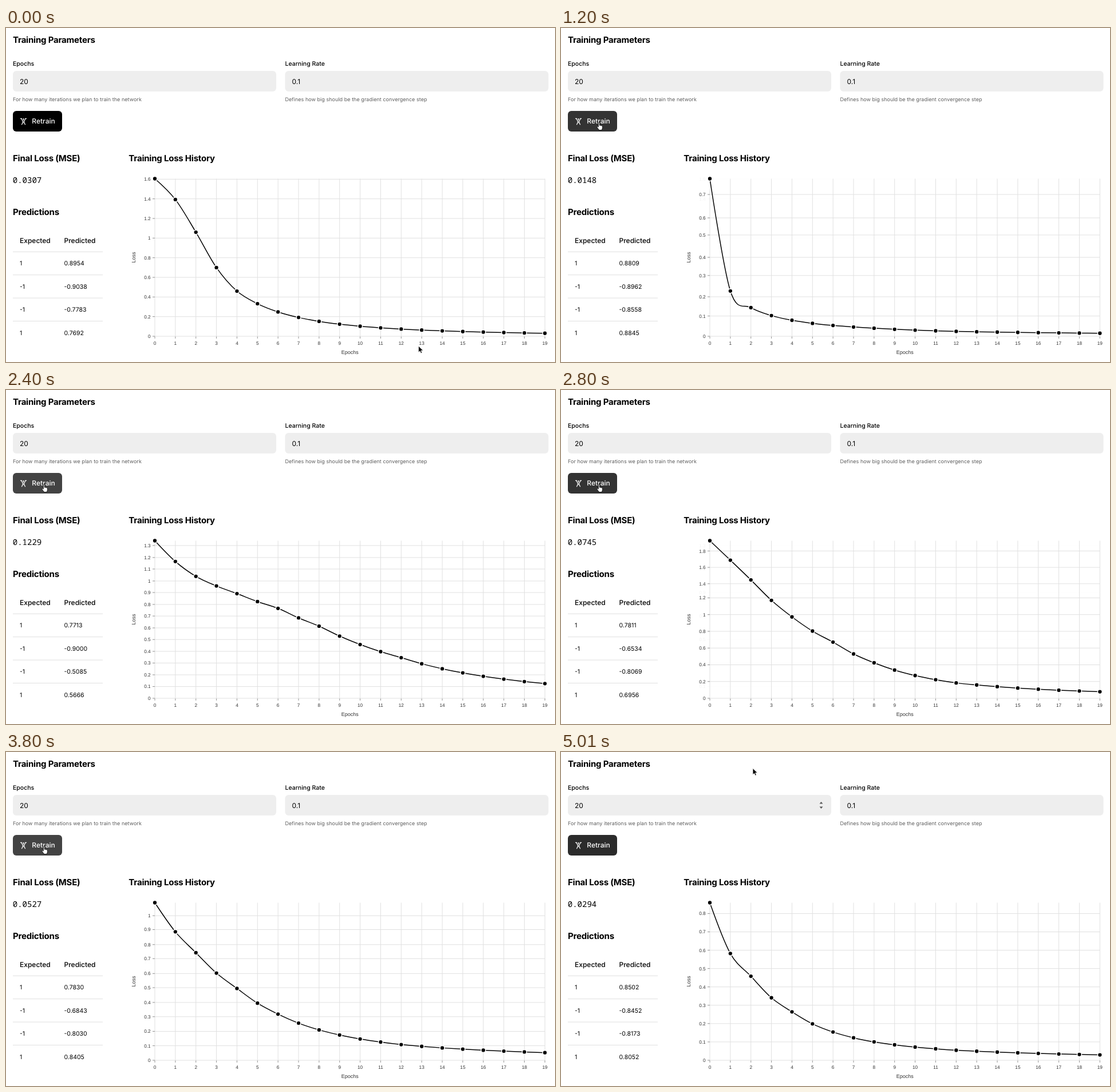
An HTML page for the animation above (5080 ms loop, 959 px wide and 584 px high).

```html
<!DOCTYPE html>
<html lang="en">
<head>
<meta charset="utf-8">
<title>Training dashboard</title>
<style>
  html, body { margin: 0; width: 100%; height: 100%; overflow: hidden; background: #fff; }
  svg { display: block; width: 100%; height: 100%; }
  text { font-family: Inter, sans-serif; font-size: 10.5px; text-rendering: geometricPrecision; }
  .title { font-size: 15px; font-weight: 700; letter-spacing: -.22px; }
  .label { font-weight: 500; }
  .value { font-size: 12px; }
  .head, .action { font-size: 12px; font-weight: 500; }
  .action { fill: #fff; }
  .hint { font-size: 9px; fill: #5e5e5e; letter-spacing: .04px; }
  .mono { font-family: "Noto Sans Mono", monospace; font-size: 14px; font-weight: 500; }
  .tick { font-family: "Liberation Sans", Arial, sans-serif; font-size: 8.25px; fill: #333; }
  .legend { font-family: "Liberation Sans", Arial, sans-serif; font-size: 9px; fill: #333; text-anchor: middle; }
  .grid { stroke: #e0e0e0; }
  .mark { stroke: #777; stroke-width: .8; }
  .curve { fill: none; stroke: #000; stroke-width: 1.5; }
  .dot { stroke: #fff; stroke-width: 1.5; }
</style>
</head>
<body>
<svg viewBox="0 0 959 584" preserveAspectRatio="none">
  <text class="title" x="12" y="26">Training Parameters</text>
  <text class="label" x="12" y="66">Epochs</text>
  <text class="label" x="487.5" y="66">Learning Rate</text>
  <rect x="12" y="75" width="460" height="36" rx="6" fill="#eee"/>
  <rect x="487.5" y="75" width="460" height="36" rx="6" fill="#eee"/>
  <text class="value" x="24" y="97.5">20</text>
  <text class="value" x="499.5" y="97.5">0.1</text>
  <path id="spinner" d="M451.5 90.5h6l-3 -3.6zM451.5 95.5h6l-3 3.6z" fill="#555"/>
  <text class="hint" x="12" y="128.3">For how many iterations we plan to train the network</text>
  <text class="hint" x="487.5" y="128.3">Defines how big should be the gradient convergence step</text>

  <rect id="button" x="12" y="145" width="86" height="36" rx="6"/>
  <g fill="none" stroke="#fff" stroke-width="1.2">
    <path d="M25 158.3h3M33 158.3h3M26.5 158.3l2.6 4.2h2.8l2.6 -4.2M29.3 162.5v2.8l-2 4M31.7 162.5v2.8l2 4M29.3 165.3h2.4"/>
    <circle cx="30.5" cy="159.6" r=".7"/>
  </g>
  <text class="action" x="45.3" y="167.4">Retrain</text>

  <text class="title" x="12" y="233.4">Final Loss (MSE)</text>
  <text class="title" x="214.3" y="233.4">Training Loss History</text>
  <text class="mono" id="loss" x="11.8" y="271"></text>
  <text class="title" x="12" y="327.4">Predictions</text>
  <text class="head" x="24" y="375.8">Expected</text>
  <text class="head" x="101.5" y="375.8">Predicted</text>
  <g id="table"></g>

  <g id="axis"></g>
  <text class="legend" x="600.7" y="569.5">Epochs</text>
  <text class="legend" transform="translate(225.8 401) rotate(-90)">Loss</text>
  <g id="plot"></g>

  <g id="arrow" stroke="#fff" stroke-width=".8">
    <path d="M0 0v11.2l2.6 -2.4l1.7 3.9l2 -.9l-1.7 -3.8h3.6z"/>
  </g>
  <g id="hand" fill="#fff" stroke="#000" stroke-width=".8" stroke-linejoin="round">
    <path d="M-1.2 7V.8q0 -1.2 1 -1.2t1 1.2v4q.9 -.8 1.8 .2q1 -.6 1.7 .4q1.6 -.4 1.6 1.2v2.6q0 1.4 -1 2.6v1.2h-5.4v-1q-1.8 -1.8 -3.2 -4.4q-.4 -1.2 .8 -1.2q.9 .2 1.7 1.4z"/>
  </g>
</svg>
<script>
const LOOP = 5080, FRAME = 1000 / 15, LEAVE = 4990, ARRIVE = 530;
const EPOCHS = 20, LEFT = 260, STEP_X = 35.86, TOP = 263.5, BASE = 539;
const RIGHT = LEFT + (EPOCHS - 1) * STEP_X;

// Losses are given at epoch 0 (max) and at these epochs (key).
const KEY_EPOCHS = [1, 2, 4, 6, 8, 12, 19];
const runs = [
  { at: 0, max: 1.605, key: [1.393, 1.06, .46, .248, .152, .073, .0307], out: "0.8954 -0.9038 -0.7783 0.7692" },
  { at: 835, max: .778, key: [.2, .122, .0715, .05, .038, .0235, .0148], out: "0.8809 -0.8962 -0.8558 0.8845" },
  { at: 1280, max: 1.921, key: [1.909, 1.897, 1.859, 1.789, 1.649, 1.048, .6432], out: "0.2695 -0.6067 0.1468 0.2455" },
  { at: 1850, max: 1.341, key: [1.163, 1.036, .888, .762, .61, .343, .1229], out: "0.7713 -0.9000 -0.5085 0.5666" },
  { at: 2440, max: 1.926, key: [1.689, 1.444, .979, .664, .409, .171, .0745], out: "0.7811 -0.6534 -0.8069 0.6956" },
  { at: 3290, max: 1.085, key: [.884, .74, .494, .317, .209, .108, .0527], out: "0.7830 -0.6843 -0.8030 0.8405" },
  { at: 3840, max: .859, key: [.582, .458, .264, .154, .1, .0546, .0294], out: "0.8502 -0.8452 -0.8173 0.8052" }
];

const $ = id => document.getElementById(id);
const clamp = v => Math.max(0, Math.min(1, v));
const mix = (a, b, k) => a + (b - a) * k;
const line = (cls, x1, y1, x2, y2, extra = "") =>
  `<line class="${cls}" x1="${x1}" y1="${y1}" x2="${x2}" y2="${y2}" ${extra}/>`;
const label = (cls, x, y, str, extra = "") =>
  `<text class="${cls}" x="${x}" y="${y}" ${extra}>${str}</text>`;
const plotY = (value, run) => BASE - value / run.max * (BASE - TOP);

// Between key epochs, max / loss - 1 grows as a power of the epoch.
function lossAt(run, epoch) {
  if (!epoch) return run.max;
  const b = Math.max(1, KEY_EPOCHS.findIndex(e => e >= epoch)), a = b - 1;
  const k = Math.log(epoch / KEY_EPOCHS[a]) / Math.log(KEY_EPOCHS[b] / KEY_EPOCHS[a]);
  const drop = i => run.max / run.key[i] - 1;
  return run.max / (1 + drop(a) ** (1 - k) * drop(b) ** k);
}

for (const run of runs) {
  const step = run.max > 1.5 ? .2 : .1;
  run.ticks = Array.from({ length: Math.floor(run.max / step) + 1 }, (_, i) => +(i * step).toFixed(1));
  run.ys = Array.from({ length: EPOCHS }, (_, i) => plotY(lossAt(run, i), run));
}

$("axis").innerHTML = Array.from({ length: EPOCHS }, (_, i) => {
  const x = LEFT + i * STEP_X;
  return line("grid", x, TOP, x, BASE) + line("mark", x, BASE, x, BASE + 4) +
    label("tick", x, 554.3, i, 'text-anchor="middle"');
}).join("");

// Critically damped spring, from 0 to 1.
const spring = ms => 1 - (1 + .013 * ms) * Math.exp(-.013 * ms);

// Cardinal spline through evenly spaced points.
function curve(ys) {
  const x = i => LEFT + i * STEP_X, last = ys.length - 1;
  const bend = i => i > 0 && i < last ? [STEP_X / 3, (ys[i + 1] - ys[i - 1]) / 6] : [0, 0];
  let d = `M${LEFT} ${ys[0]}`;
  for (let i = 0; i < last; i++) {
    const [ax, ay] = bend(i), [bx, by] = bend(i + 1);
    d += `C${x(i) + ax} ${ys[i] + ay} ${x(i + 1) - bx} ${ys[i + 1] - by} ${x(i + 1)} ${ys[i + 1]}`;
  }
  return d;
}

function drawPlot(run, prev, k) {
  const tick = (value, y, opacity) => `<g opacity="${opacity}">` +
    line("grid", LEFT, y, RIGHT, y) + line("mark", LEFT - 4, y, LEFT, y) +
    label("tick", 252.6, y + 3, value, 'text-anchor="end"') + "</g>";
  const entering = run.ticks.map(v => prev.ticks.includes(v)
    ? tick(v, mix(plotY(v, prev), plotY(v, run), k), 1)
    : tick(v, plotY(v, run), k));
  const leaving = prev.ticks.filter(v => !run.ticks.includes(v))
    .map(v => tick(v, plotY(v, prev), 1 - k));
  const ys = run.ys.map((y, i) => mix(prev.ys[i], y, k));
  const dots = ys.map((y, i) => `<circle class="dot" cx="${LEFT + i * STEP_X}" cy="${y}" r="3.9"/>`);
  $("plot").innerHTML = [...entering, ...leaving, `<path class="curve" d="${curve(ys)}"/>`, ...dots].join("");
}

function drawTable(run) {
  const out = run.out.split(" ");
  $("loss").textContent = run.key.at(-1).toFixed(4);
  $("table").innerHTML = [1, -1, -1, 1].map((expected, i) => {
    const y = 415.3 + i * 40.4;
    return line("grid", 12, y - 24, 169, y - 24) +
      label("cell", 24, y, expected) + label("cell", 101.5, y, out[i]);
  }).join("");
}

function drawPointer(t) {
  const left = t >= LEAVE, over = t >= 460 && !left;
  const go = clamp(t / ARRIVE), ease = go * go * (3 - 2 * go);
  const x = left ? 335 : mix(720.5, 66.5, ease);
  const y = left ? 28.5 : mix(556, 165.5, ease);
  for (const id of ["arrow", "hand"]) $(id).setAttribute("transform", `translate(${x} ${y})`);
  $("arrow").style.display = over ? "none" : "";
  $("hand").style.display = over ? "" : "none";
  $("spinner").style.display = left ? "" : "none";

  const pressed = runs.some(r => r.at && Math.abs(t - r.at) < 45);
  const shade = left ? 43 : pressed ? 67 : Math.round(51 * clamp((t - 440) / 200));
  $("button").setAttribute("fill", `rgb(${shade},${shade},${shade})`);
}

let shown = -1;
function render(now) {
  const frame = Math.floor((now % LOOP) / FRAME + .06);
  if (frame === shown) return;
  shown = frame;
  const t = frame * FRAME + .5;
  const index = runs.filter(r => r.at <= t).length - 1;
  const run = runs[index];
  drawTable(run);
  drawPlot(run, runs[Math.max(0, index - 1)], index ? spring(t - run.at) : 1);
  drawPointer(t);
}

const start = performance.now();
function loop() {
  render(performance.now() - start);
  requestAnimationFrame(loop);
}
loop();
</script>
</body>
</html>
```
